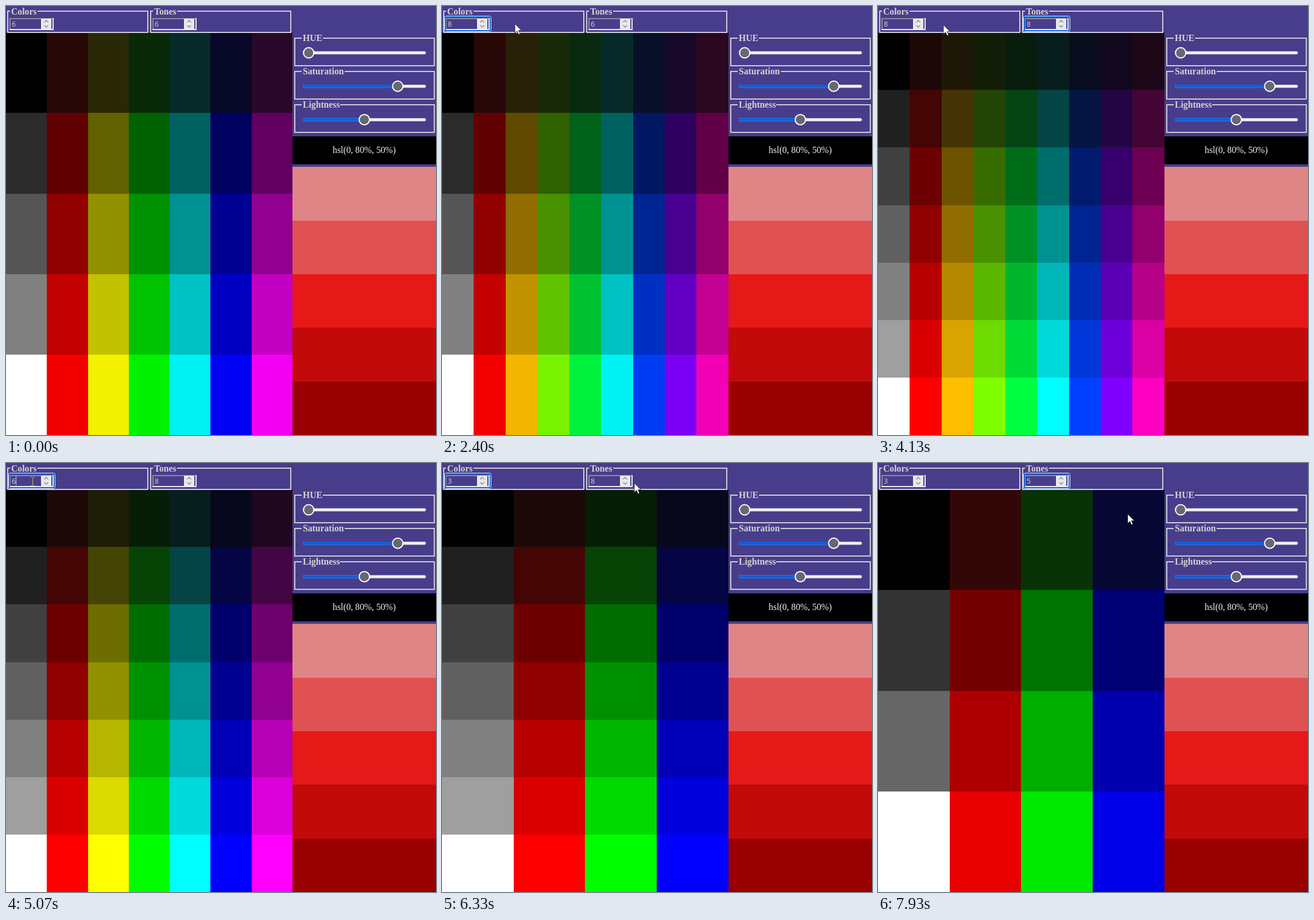
An HTML page that plays this animation: 749x747 px, repeating every 8000 ms.

```html
<!DOCTYPE html>
<html lang="en">
<head>
<meta charset="utf-8">
<title>Color palette</title>
<style>
  html, body { margin: 0; width: 100%; height: 100%; overflow: hidden; background: #483d8b; }
  svg { display: block; width: 749px; height: 747px; }
  text { font: 15.7px "Liberation Serif", "Times New Roman", serif; fill: #f4f4f4; }
  .legend { font-weight: bold; fill: #d3d3d3; }
  .digit { font: 12.5px "Open Sans", sans-serif; fill: #d3d3d3; }
  .frame { fill: none; stroke: #cfcdd8; stroke-width: 2; }
  #grid, #shades { shape-rendering: crispEdges; }
</style>
</head>
<body>
<svg viewBox="0 0 749 747">
  <rect width="749" height="747" fill="#483d8b"/>
  <g id="grid"></g>
  <g id="shades"></g>
  <rect x="499" y="227" width="250" height="48.5"/>
  <text x="624" y="256" text-anchor="middle">hsl(0, 80%, 50%)</text>
  <g id="panels"></g>
  <g id="beam" fill="none" stroke="#b7c274">
    <path d="M-3-7.5h2.5M1.5-7.5H4M-3 7.5h2.5M1.5 7.5H4M.5-7V7"/>
  </g>
  <path id="arrow" d="M0 0V16L3.8 12.6 6.4 18.6 9 17.4 6.4 11.6H11.4Z" fill="#fff" stroke="#222" stroke-width=".8"/>
</svg>
<script>
const $ = id => document.getElementById(id);
const FPS = 15, TICKS = 120;

// Each field is clicked, then its value is stepped a few times at an even pace (ticks)
const edits = [
  { id: 'colors', click: 20, first: 24, gap: 7, count: 2, step: 1 },
  { id: 'tones', click: 45, first: 48, gap: 7, count: 2, step: 1 },
  { id: 'colors', click: 68, first: 73, gap: 3, count: 5, step: -1 },
  { id: 'tones', click: 103, first: 106, gap: 4, count: 3, step: -1 },
];
const entry = { start: 13, x: 69, y: 50 };
const moves = [
  { start: 13, length: 4, x: 37, y: 28 },
  { start: 34, length: 9, x: 283, y: 35 },
  { start: 59, length: 6, x: 46, y: 32 },
  { start: 90, length: 5, x: 335, y: 35 },
  { start: 96, length: 5, x: 284, y: 33 },
  { start: 116, length: 3, x: 435, y: 89 },
];

const clamp = (v, lo, hi) => Math.min(hi, Math.max(lo, v));
const rect = (x, y, w, h, fill) => `<rect x="${x}" y="${y}" width="${w}" height="${h}" fill="${fill}"/>`;

function legendBox(x, y, w, h, gap, gapWidth, label, baseline) {
  return `<path class="frame" d="M${x + gap} ${y}H${x}V${y + h}H${x + w}V${y}H${x + gap + gapWidth}"/>
    <text class="legend" x="${x + gap + 2}" y="${baseline}">${label}</text>`;
}

function numberBox(id, x, label, gapWidth) {
  return legendBox(x + 3, 9, 244, 37, 4, gapWidth, label, 14.5) + `<g transform="translate(${x})">
    <path d="M7 42V22H82" fill="none" stroke="#8d8b98" stroke-width="2"/>
    <path d="M6 41H82V21" fill="none" stroke="#eeeef2" stroke-width="2"/>
    ${rect(61, 22, 18, 18, '#e9e9ed')}
    <path d="M66.5 28.5L70 25 73.5 28.5M66.5 33.5L70 37 73.5 33.5" fill="none" stroke="#85858c" stroke-width="1.3"/>
    <g id="${id}Ring" fill="none">
      <rect x="4.5" y="17.5" width="81" height="27" rx="3" stroke="#d9e8fb"/>
      <rect x="6" y="19" width="78" height="24" rx="2" stroke="#0a66e0" stroke-width="2"/>
    </g>
    <text class="digit" id="${id}Text" x="10" y="36"></text>
    <rect id="${id}Caret" x="17" y="23" width="1" height="16" fill="#d3d3d3"/>
  </g>`;
}

function slider(row, percent, gapWidth, label) {
  const y = 56 + row * 58.2, mid = y + 25.5, thumb = 527.2 + percent * 1.94;
  const track = (w, h, fill) =>
    `<rect x="517" y="${mid - h / 2}" width="${w}" height="${h}" rx="${h / 2}" fill="${fill}"/>`;
  return legendBox(503, Math.round(y), 243, 48, 12, gapWidth, label, y + 5) +
    track(214.5, 5.5, '#b9b9c6') + track(214, 4.5, '#efeff2') + track(thumb - 517, 5.5, '#0b61dc') +
    `<circle cx="${thumb}" cy="${mid}" r="9" fill="#686872" stroke="#fff" stroke-width="2"/>`;
}

$('panels').innerHTML =
  numberBox('colors', 0, 'Colors', 48) + numberBox('tones', 249, 'Tones', 42) +
  slider(0, 0, 37, 'HUE') + slider(1, 80, 75, 'Saturation') + slider(2, 50, 67, 'Lightness');

let shades = '';
for (let i = 0; i < 5; i++)
  shades += rect(499, 280.4 + i * 93.32, 250, 93.32, `hsl(0, ${60 + i * 10}%, ${70 - i * 10}%)`);
$('shades').innerHTML = shades;

function drawGrid(nColors, nTones) {
  const top = 46.2, w = 498.8 / (nColors + 1), rows = nTones - 1, h = (747 - top) / rows;
  let out = '';
  for (let r = 0; r < rows; r++) {
    const gray = r === rows - 1 ? 100 : r * 100 / nTones;
    const light = (r + 1) * 57 / nTones, sat = Math.min(100, 30 + light * 4);
    for (let c = 0; c <= nColors; c++) {
      const fill = c ? `hsl(${(c - 1) * 360 / nColors}, ${sat}%, ${light}%)` : `hsl(0, 0%, ${gray}%)`;
      out += rect(c * w, top + r * h, w, h, fill);
    }
  }
  $('grid').innerHTML = out;
}

// Values, focused field and the latest click or key press at tick n
function formState(n) {
  const state = { values: { colors: 6, tones: 6 }, active: '', touched: 0 };
  for (const e of edits) {
    if (n < e.click) break;
    const done = clamp(Math.floor((n - e.first) / e.gap) + 1, 0, e.count);
    state.values[e.id] += done * e.step;
    state.active = e.id;
    state.touched = done ? e.first + (done - 1) * e.gap : e.click;
  }
  return state;
}

// The blink timer runs freely; input only switches the caret back on
const blink = n => Math.floor((n - 26.4) / 8.3);
const caretOn = (n, touched) => (blink(n) - blink(touched)) % 2 === 0;

function pointer(n) {
  let { x, y } = entry;
  for (const m of moves) {
    const k = 1 - (1 - clamp((n - m.start) / m.length, 0, 1)) ** 1.8;
    x += (m.x - x) * k;
    y += (m.y - y) * k;
  }
  return [Math.round(x), Math.round(y)];
}

const show = (id, on) => $(id).setAttribute('visibility', on ? 'visible' : 'hidden');

function render(n) {
  const { values, active, touched } = formState(n);
  drawGrid(values.colors, values.tones);
  for (const id in values) {
    $(id + 'Text').textContent = values[id];
    show(id + 'Ring', active === id);
    show(id + 'Caret', active === id && caretOn(n, touched));
  }
  const [x, y] = pointer(n), visible = n >= entry.start;
  const inField = left => x > left && x < left + 55;
  const overText = y > 20 && y < 42 && (inField(6) || inField(255));
  show('beam', visible && overText);
  show('arrow', visible && !overText);
  for (const id of ['beam', 'arrow']) $(id).setAttribute('transform', `translate(${x} ${y})`);
}

let last = -1;
function frame() {
  const n = Math.floor((performance.now() + 4) * FPS / 1000) % TICKS;
  if (n !== last) render(last = n);
  requestAnimationFrame(frame);
}
frame();
</script>
</body>
</html>
```
